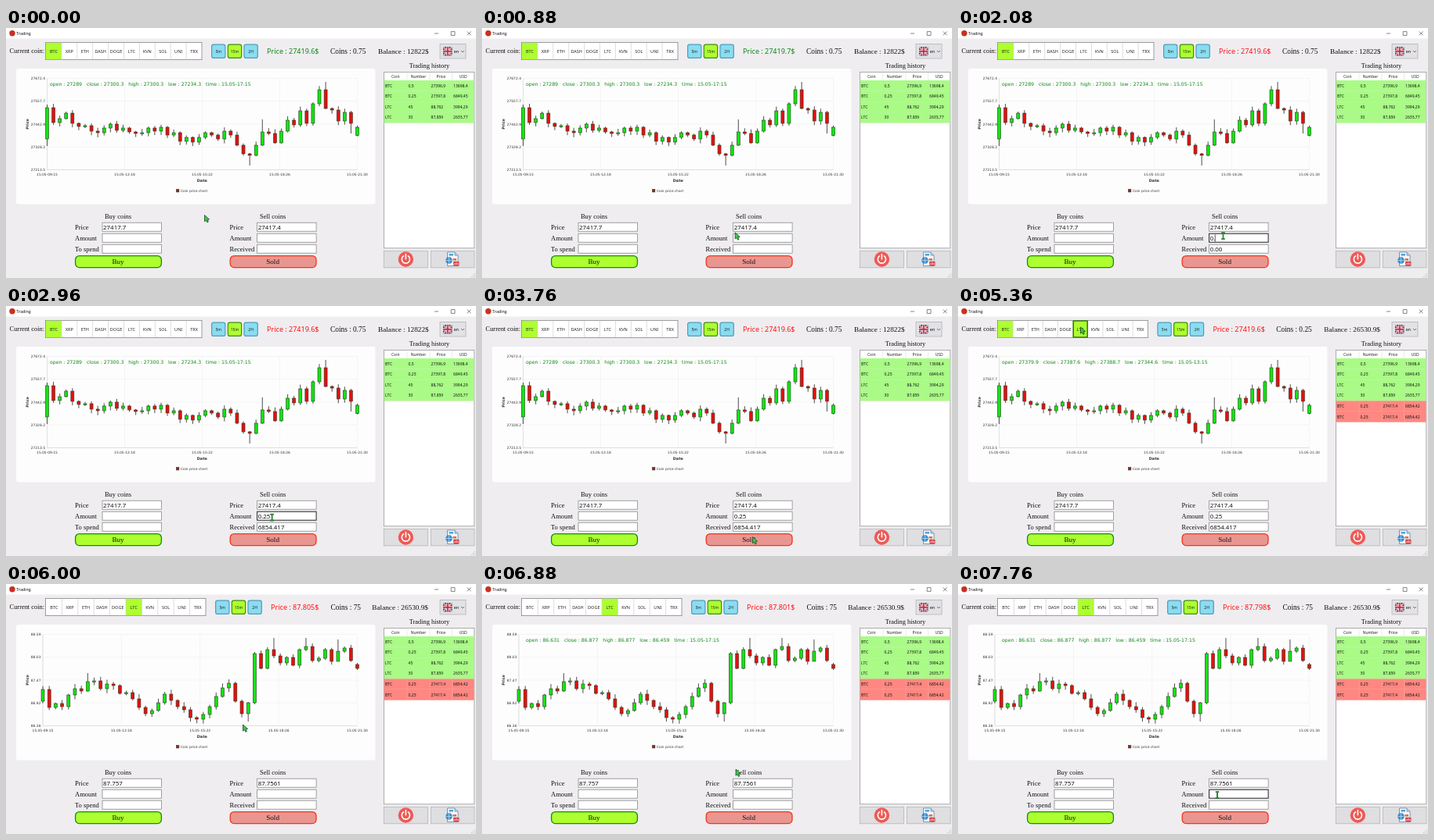
Animation of 600 by 320 pixels, one loop 8 s. Source, as an HTML page:

```html
<!DOCTYPE html>
<html lang="en">
<head>
<meta charset="utf-8">
<title>Trading</title>
<style>
html, body { margin: 0; width: 100%; height: 100%; overflow: hidden; background: #efedf0; }
svg { display: block; width: 600px; height: 320px; }
text { white-space: pre; }
.ui { font-family: "Noto Sans", "Open Sans", sans-serif; }
.chart { font-family: "DejaVu Sans", sans-serif; }
.serif { font-family: "Liberation Serif", "Times New Roman", serif; }
</style>
</head>
<body>
<svg id="stage" viewBox="0 0 600 320" xmlns="http://www.w3.org/2000/svg"></svg>
<script>
const LOOP = 8000, STEP = 80;
const COINS = ['BTC', 'XRP', 'ETH', 'DASH', 'DOGE', 'LTC', 'KVN', 'SOL', 'UNI', 'TRX'];
const LIME = '#adff2f', RED = '#ff1010', GREEN = '#0b8a12';

const rect = (x, y, w, h, fill, stroke = 'none', sw = 1, r = 0) =>
  `<rect x="${x}" y="${y}" width="${w}" height="${h}" rx="${r}" fill="${fill}" stroke="${stroke}" stroke-width="${sw}"/>`;
const path = (d, stroke, sw = 1, fill = 'none', extra = '') =>
  `<path d="${d}" stroke="${stroke}" stroke-width="${sw}" fill="${fill}" ${extra}/>`;
const circle = (x, y, r, fill) => `<circle cx="${x}" cy="${y}" r="${r}" fill="${fill}"/>`;
const text = (cls, x, y, size, str, fill = '#111', anchor = 'start', extra = '') =>
  `<text class="${cls}" x="${x}" y="${y}" font-size="${size}" fill="${fill}" text-anchor="${anchor}" ${extra}>${str}</text>`;
const serif = (x, y, size, str, anchor) => text('serif', x, y, size, str, '#111', anchor);

// Each candle opens at the previous close; values are heights on the stage.
const BTC = {
  left: 52.5, open: 142, lastOpen: 137.5, seed: 7,
  closes: [102, 121, 116, 109, 122, 126, 125, 132, 134, 128,
    123, 131, 128, 133, 135, 134, 128, 132, 127, 137,
    134, 145, 140, 146, 140, 134, 137, 142, 132, 137,
    150, 161, 163, 150, 133, 135, 147, 132, 118, 124,
    106, 122, 97, 79, 103, 105, 119, 108, 122, 127],
  wicks: { 0: [98, 151], 1: [97, 124], 3: [107, 117], 32: [160, 176], 34: [117, 151], 44: [69, 104], 48: [106, 135] },
  prices: ['27672.4', '27557.7', '27442.9', '27328.2', '27213.5'],
  times: ['09:15', '12:18', '15:22', '18:26', '21:30']
};
const LTC = {
  left: 47, open: 150, lastOpen: 103, seed: 21,
  closes: [135, 158, 153, 157, 142, 134, 137, 125, 124, 134,
    128, 130, 140, 139, 147, 158, 166, 162, 152, 141,
    149, 157, 161, 171, 173, 167, 157, 144, 133, 127,
    150, 166, 152, 89, 108, 84, 92, 101, 94, 104,
    84, 80, 98, 95, 84, 99, 86, 82, 98, 108],
  wicks: { 7: [114, 138], 32: [151, 176], 33: [87, 154], 36: [69, 95], 41: [69, 86], 46: [71, 99], 49: [101, 110] },
  prices: ['88.59', '88.03', '87.47', '86.92', '86.36'],
  times: ['09:15', '12:18', '15:22', '18:26', '21:30']
};

function random(seed) {
  return () => (seed = (seed * 16807) % 2147483647) / 2147483647;
}

function drawChart(c) {
  const right = 448.5, gap = (right - c.left) / 49, rnd = random(c.seed * 9973);
  let out = '';
  for (let i = 0; i < 5; i++) {
    const y = 64.5 + i * 29.25, x = c.left + (right - c.left) * i / 4;
    out += path(`M${c.left} ${y}H${right}M${x} 64.5V181.5`, '#eeeeee', 0.6);
    out += text('chart', c.left - 2.5, y + 1.5, 4.45, c.prices[i], '#333', 'end');
    out += text('chart', x, 188.7, 4.4, '15.05-' + c.times[i], '#333', 'middle');
  }
  out += path(`M${c.left} 64.5V181.5H${right}`, '#d2d2d2', 0.6);
  let open = c.open;
  c.closes.forEach((close, i) => {
    if (i === 49) open = c.lastOpen;
    const top = Math.min(open, close), bottom = Math.max(open, close);
    const [hi, lo] = c.wicks[i] || [top - 1 - 5 * rnd(), bottom + 1 + 5 * rnd()];
    const x = c.left + i * gap;
    out += path(`M${x} ${hi}V${lo}`, '#222', 0.8);
    out += rect(x - 2, top, 4, Math.max(1.4, bottom - top), close < open ? '#12e512' : '#e60f0f', '#2b3a20', 0.6);
    open = close;
  });
  return out;
}

function drawInput(x, y, value, focused) {
  return rect(x + 0.5, y + 0.5, 75.5, 11, '#fff', focused ? '#222' : '#8b8b8b', focused ? 1 : 0.8) +
    text('ui', x + 1.6, y + 9.1, 7.9, value);
}

function drawForm(x, labels, title, values, button, focused) {
  let out = serif(x + 55, 244, 8.5, title, 'middle');
  labels.forEach((label, i) => {
    const y = 249 + i * 14;
    out += serif(x, y + 8.5, 8.5, label) + drawInput(x + 34.5, y - 0.3, values[i], focused && i === 1);
  });
  out += rect(x + 0.6, 291.6, 109.8, 15, button.fill, button.edge, 1.3, 5);
  return out + serif(x + 55, 302.3, 9.1, button.name, 'middle');
}

function drawFlag() {
  return rect(558, 24, 11.5, 11.5, '#27407f', 'none', 0, 1.5) +
    path('M558.4 24.4L569.1 35.1M569.1 24.4L558.4 35.1', '#f3f0f4', 2) +
    path('M558.4 24.4L569.1 35.1M569.1 24.4L558.4 35.1', '#d0313f', 0.8) +
    path('M563.75 24V35.5M558 29.75H569.5', '#f7f4f7', 3.4) +
    path('M563.75 24V35.5M558 29.75H569.5', '#d0293a', 1.9);
}

function drawFrame() {
  let out = rect(0, 0, 600, 320, '#efedf0') + rect(0, 0, 600, 13.5, '#fff');
  out += circle(8, 6.7, 3.7, '#c9301f') + text('ui', 13.3, 8.7, 5.2, 'Trading');
  out += path('M547 7H552M568.2 4.6H573V9.4H568.2ZM588.8 4.5L593.6 9.3M593.6 4.5L588.8 9.3', '#333', 0.6);
  out += serif(4.6, 32.4, 8.4, 'Current coin:');
  out += rect(554, 20.5, 33, 18.5, '#e2e1e3', '#b4b4b6', 0.8) + drawFlag();
  out += text('ui', 571.8, 32, 5.4, 'en') + path('M581 29L583 31L585 29', '#444', 0.7);
  out += rect(13, 52, 458.5, 173.5, '#fdfdfd', 'none', 0, 3);
  out += text('chart', 250.3, 196.7, 4.9, 'Date', '#333', 'middle', 'font-weight="bold"');
  out += text('chart', 0, 0, 4.8, 'Price', '#333', 'middle', 'font-weight="bold" transform="translate(28.6 123) rotate(-90)"');
  out += rect(217.3, 206.4, 3.6, 3.6, '#8c2a1c', '#333', 0.5) + text('chart', 223, 209.8, 4.3, 'Coin price chart', '#333');
  out += serif(540.5, 51.2, 8.4, 'Trading history', 'middle');
  out += rect(482.3, 285.3, 56.3, 21.5, '#dfdee1', '#b5b5b8', 0.8) + rect(542.3, 285.3, 55.7, 21.5, '#dfdee1', '#b5b5b8', 0.8);
  out += circle(510.4, 296, 9.7, '#ee5a56');
  out += path('M507.4 291.9A5.1 5.1 0 1 0 513.4 291.9M510.4 289.6V295.8', '#fff', 1.6, 'none', 'stroke-linecap="round"');
  out += path('M563.5 287H573L577 291V304.5H563.5Z', '#5b7fa8', 0.8, '#f6f8fb') + path('M573 287V291H577', '#5b7fa8', 0.7, '#bcd0e4');
  out += rect(565.5, 289, 5.5, 2.5, '#4fa5d8') + rect(570.5, 295, 4.5, 2.5, '#e56a4c') + rect(571, 298.5, 5, 4.5, '#67b35a');
  out += circle(565.5, 297.5, 4.4, '#3d8fd0') + path('M561.1 297.5H569.9M565.5 293.1V301.9', '#d8ecf8', 0.6);
  out += rect(571.5, 299, 7, 5.5, '#d5434a', 'none', 0, 0.8) + path('M573 303V301M575 303V300M577 303V301', '#fff', 0.8);
  out += path('M598 314.5h.9M596 316.5h2.9M594 318.5h4.9', '#b3b2b5', 0.9, 'none', 'stroke-dasharray="1 1"');
  return out;
}

function drawHistory(sales) {
  const cols = [482.5, 512, 541, 569.5, 598];
  const rows = [
    ['BTC', '0,5', '27396,9', '13698,4'], ['BTC', '0,25', '27397,8', '6849,45'],
    ['LTC', '45', '88,762', '3994,29'], ['LTC', '30', '87,859', '2635,77']
  ];
  for (let i = 0; i < sales; i++) rows.push(['BTC', '0,25', '27417,4', '6854,42']);
  let out = rect(482.4, 56.4, 115.4, 225.4, '#fff', '#99999c', 0.8);
  ['Coin', 'Number', 'Price', 'USD'].forEach((h, i) => {
    out += text('ui', (cols[i] + cols[i + 1]) / 2, 63.7, 5, h, '#222', 'middle');
    if (i) out += path(`M${cols[i]} 57V67`, '#dedee0', 0.6);
  });
  rows.forEach((row, r) => {
    const y = 67 + r * 13.6;
    out += rect(482.8, y, 114.7, 13.6, r < 4 ? '#a9fb86' : '#ff8781');
    out += path(`M482.8 ${y + 13.4}H597.5M512 ${y}v13.6M541 ${y}v13.6M569.5 ${y}v13.6`, r < 4 ? '#b9eea0' : '#f3a6a2', 0.6);
    row.forEach((s, i) => { out += text('ui', cols[i] + 1.6, y + 8.5, 5, s); });
  });
  return out;
}

// The bar shares its width: longer labels on the right squeeze the coin list.
function drawBar(s) {
  const bal = s.balance.includes('.') ? 467.3 : 475;
  const coins = bal - 42.4 - (s.coins.includes('.') ? 4.65 * s.coins.length : 10.3);
  const price = coins - (s.ltc ? 75.8 : 80.2), btn = price - 71.8, end = btn - 12;
  const w = (end - 51) / 10;
  let out = rect(50.5, 18.4, end - 50.5, 22.2, '#fff', '#86868a', 0.8);
  COINS.forEach((name, i) => {
    const x = 51 + w * i, on = i === (s.ltc ? 5 : 0) || (i === 5 && s.hoverCoin);
    if (on) out += rect(x, 18.8, w, 21.4, LIME);
    if (i) out += path(`M${x} 18.8V40.2`, '#cfcfd2', 0.7);
    out += text('ui', x + w / 2, 31.6, 5.5, name, '#222', 'middle');
  });
  if (s.hoverCoin) out += rect(51 + w * 5 + 0.6, 19, w - 1.2, 21, 'none', '#2f6f10', 1.4);
  ['5m', '15m', '2H'].forEach((name, i) => {
    const x = btn + 0.6 + i * 20.7, on = i === 1;
    out += rect(x, 21.1, 17.3, 17.3, on ? LIME : '#8adcf0', on ? '#3f8d14' : '#4f9dbb', 1.2, 2.5);
    out += text('ui', x + 8.65, 31.7, 5, name, '#222', 'middle');
  });
  out += text('ui', price - 0.7, 33.2, 9, `Price : ${s.price}$`, s.up ? GREEN : RED);
  return out + serif(coins, 33, 9.35, 'Coins : ' + s.coins) + serif(bal, 33, 9.25, `Balance : ${s.balance}$`);
}

const TRACK = [
  [0, 253.5, 239.5], [400, 253.5, 239.5], [1040, 336, 266], [1200, 336, 266], [1280, 338.5, 266],
  [2800, 338.5, 266], [3440, 345.5, 295.5], [4720, 345.5, 295.5], [5360, 156.5, 27],
  [5520, 156.5, 27], [6000, 302.5, 180], [6160, 304, 183], [6240, 304, 183], [6480, 309, 166],
  [7120, 331, 270], [8000, 331, 270]
];

function cursorAt(t) {
  const i = Math.max(1, TRACK.findIndex(p => p[0] > t));
  const [t0, x0, y0] = TRACK[i - 1], [t1, x1, y1] = TRACK[i];
  const k = (t - t0) / (t1 - t0), e = k * k * (3 - 2 * k);
  return [x0 + (x1 - x0) * e, y0 + (y1 - y0) * e];
}

function drawCursor([x, y]) {
  const overInput = x > 320 && x < 396 && y > 249 && y < 289 && (y - 249) % 14 < 12;
  if (overInput) {
    const d = `M${x - 2.2} ${y - 4}h4.4M${x} ${y - 4}v8M${x - 2.2} ${y + 4}h4.4`;
    return path(d, '#124d1c', 1.7) + path(d, '#36a646', 0.8);
  }
  return path(`M${x} ${y}v8.2l1.9 -1.7 1.5 2.9 1.5 -.8 -1.4 -2.8 2.6 -.3z`, '#174a20', 0.8, '#3ccb4d');
}

// Last value whose start time has been reached.
const since = (t, list) => list.reduce((v, [at, next]) => t >= at ? next : v, list[0][1]);

const INFO = [
  [0, 'open : 27289   close : 27300.3   high : 27300.3   low : 27234.3   time : 15.05-17:15'],
  [5120, 'open : 27379.9   close : 27387.6   high : 27388.7   low : 27344.6   time : 15.05-13:15'],
  [5520, ''],
  [6480, 'open : 86.631   close : 86.877   high : 86.877   low : 86.459   time : 15.05-17:15']
];

function drawScene(t) {
  const ltc = t >= 5520, sales = t >= 4560 ? 2 : t >= 3920 ? 1 : 0;
  const amount = since(t, [[0, ''], [1840, '0'], [2080, '0.'], [2160, '0.2'], [2400, '0.25'], [5520, '']]);
  const received = since(t, [[0, ''], [1840, '0.00'], [2160, '5483.534'], [2400, '6854.417'], [5520, '']]);
  const focused = (t >= 1040 && t < 3680) || t >= 7120;
  const caret = since(t, [[0, 0], [1280, 1], [1680, 0], [1840, 1], [2880, 0], [3360, 1], [3680, 0], [7200, 1], [7600, 0]]);
  const caretX = 321.6 + amount.replace('.', '').length * 4.52 + (amount.includes('.') ? 2.1 : 0);

  return drawBar({
    ltc, hoverCoin: t >= 5280 && !ltc,
    price: since(t, [[0, '27419.6'], [800, '27419.7'], [2080, '27419.6'], [5520, '87.805'], [6720, '87.801'], [7760, '87.798']]),
    up: t < 2080,
    coins: ltc ? '75' : ['0.75', '0.5', '0.25'][sales],
    balance: ['12822', '19676.4', '26530.9'][sales]
  }) + drawHistory(sales) + (ltc ? ltcChart : btcChart) +
    text('chart', 56, 74.2, 6.18, since(t, INFO), '#11891a') +
    drawForm(88, ['Price', 'Amount', 'To spend'], 'Buy coins', [ltc ? '87.757' : '27417.7', '', ''],
      { name: 'Buy', fill: LIME, edge: '#168a18' }, false) +
    drawForm(285.6, ['Price', 'Amount', 'Received'], 'Sell coins', [ltc ? '87.7561' : '27417.4', amount, received],
      { name: 'Sold', fill: '#e99691', edge: '#f2341c' }, focused) +
    (caret ? path(`M${caretX} 264.3V273.6`, '#111', 0.7) : '') +
    drawCursor(cursorAt(t));
}

const btcChart = drawChart(BTC), ltcChart = drawChart(LTC);
const stage = document.getElementById('stage');
stage.innerHTML = drawFrame() + '<g id="scene"></g>';
const scene = document.getElementById('scene');
const start = performance.now();
let shown = -1;

function tick() {
  const t = Math.floor(((performance.now() - start) % LOOP) / STEP) * STEP;
  if (t !== shown) scene.innerHTML = drawScene(shown = t);
  requestAnimationFrame(tick);
}
tick();
</script>
</body>
</html>
```
